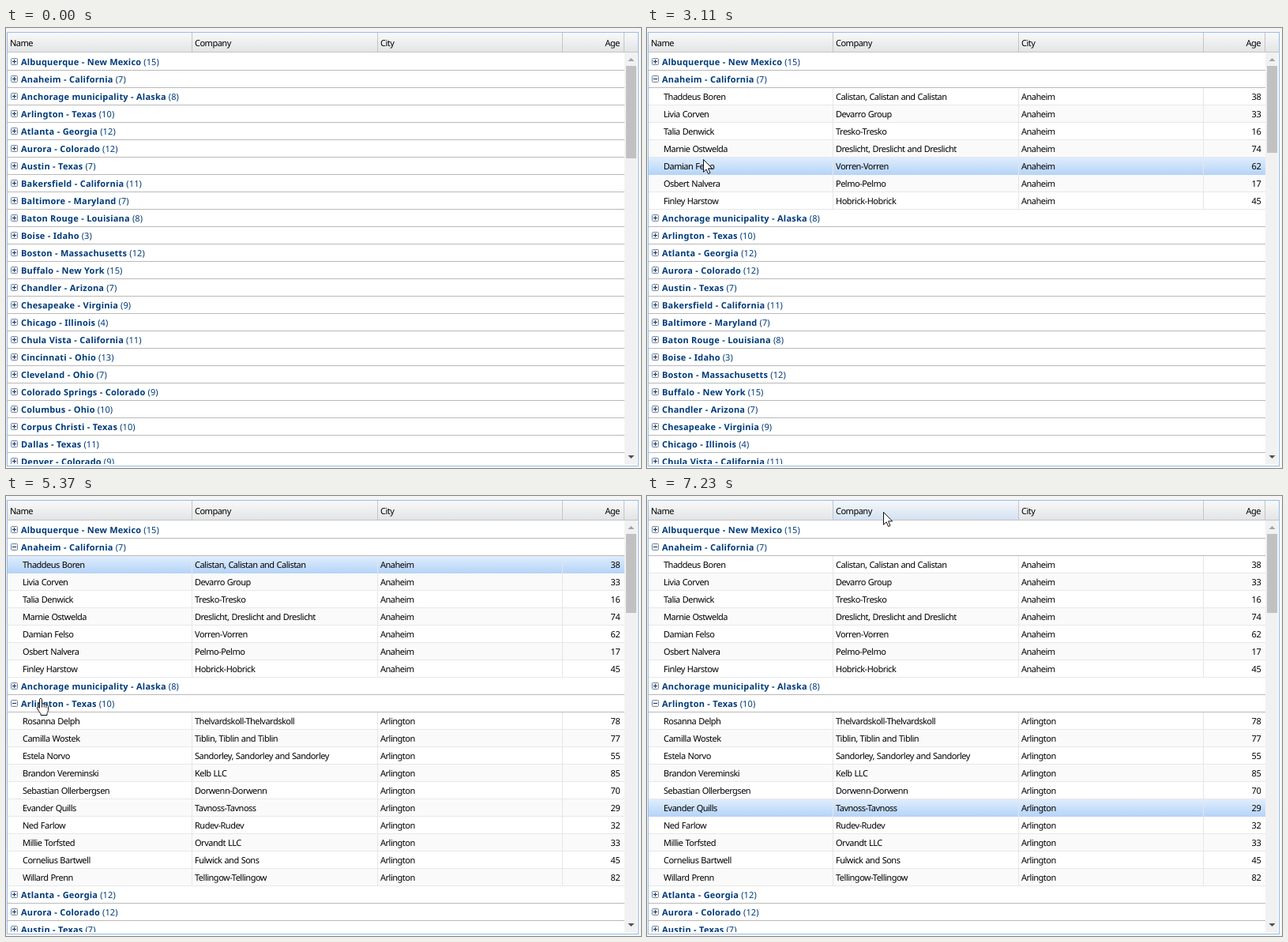
Recreate the animation shown at these times as an HTML page. Size 804x557 px, loop 8000 ms.

```html
<!DOCTYPE html>
<html lang="en">
<head>
<meta charset="utf-8">
<title>Grouped grid</title>
<style>
  html, body { margin: 0; width: 100%; height: 100%; overflow: hidden; background: #f5f5f5; }
  svg { display: block; width: 100vw; height: 100vh; cursor: default; }
  text { font: 11px "Noto Sans", "Open Sans", sans-serif; letter-spacing: -.5px; word-spacing: .6px;
         fill: #000; white-space: pre; text-rendering: geometricPrecision; }
  .group { font-weight: 700; letter-spacing: .2px; word-spacing: .2px; fill: #003b7a; }
  .count { font-weight: 400; letter-spacing: .1px; }
  .num { letter-spacing: -.25px; text-anchor: end; }
</style>
</head>
<body>
<svg id="stage" viewBox="0 0 804 557" preserveAspectRatio="none">
  <defs>
    <linearGradient id="head" x2="0" y2="1"><stop stop-color="#f9f9f9"/><stop offset="1" stop-color="#e3e4e6"/></linearGradient>
    <linearGradient id="headOver" x2="0" y2="1"><stop stop-color="#f6f8fb"/><stop offset="1" stop-color="#d3e1f1"/></linearGradient>
    <linearGradient id="rowOver" x2="0" y2="1"><stop stop-color="#dfedfe"/><stop offset="1" stop-color="#b5d3f7"/></linearGradient>
    <clipPath id="body"><rect x="2" y="31" width="781" height="521"/></clipPath>
  </defs>
</svg>
<script>
const LOOP = 8000, TOP = 32, ROW = 22, BOTTOM = 552;
const COLS = [235, 470, 704];
const svg = document.getElementById('stage');

const groups = `Albuquerque - New Mexico|15
Anaheim - California|7
Anchorage municipality - Alaska|8
Arlington - Texas|10
Atlanta - Georgia|12
Aurora - Colorado|12
Austin - Texas|7
Bakersfield - California|11
Baltimore - Maryland|7
Baton Rouge - Louisiana|8
Boise - Idaho|3
Boston - Massachusetts|12
Buffalo - New York|15
Chandler - Arizona|7
Chesapeake - Virginia|9
Chicago - Illinois|4
Chula Vista - California|11
Cincinnati - Ohio|13
Cleveland - Ohio|7
Colorado Springs - Colorado|9
Columbus - Ohio|10
Corpus Christi - Texas|10
Dallas - Texas|11
Denver - Colorado|9`.split('\n').map(line => line.split('|'));

const people = {
  Anaheim: `Thaddeus Boren|Calistan, Calistan and Calistan|38
Livia Corven|Devarro Group|33
Talia Denwick|Tresko-Tresko|16
Marnie Ostwelda|Dreslicht, Dreslicht and Dreslicht|74
Damian Felso|Vorren-Vorren|62
Osbert Nalvera|Pelmo-Pelmo|17
Finley Harstow|Hobrick-Hobrick|45`,
  Arlington: `Rosanna Delph|Thelvardskoll-Thelvardskoll|78
Camilla Wostek|Tiblin, Tiblin and Tiblin|77
Estela Norvo|Sandorley, Sandorley and Sandorley|55
Brandon Vereminski|Kelb LLC|85
Sebastian Ollerbergsen|Dorwenn-Dorwenn|70
Evander Quills|Tavnoss-Tavnoss|29
Ned Farlow|Rudev-Rudev|32
Millie Torfsted|Orvandt LLC|33
Cornelius Bartwell|Fulwick and Sons|45
Willard Prenn|Tellingow-Tellingow|82`
};

// Each state of the list starts at a time and has its own scroll thumb end
const views = [
  { from: 0, open: [], thumbEnd: 165 },
  { from: 1720, open: ['Anaheim'], thumbEnd: 158 },
  { from: 5370, open: ['Anaheim', 'Arlington'], thumbEnd: 148 }
];

// Pointer moves: "live" is how many steps still update the row highlight
const moves = [
  { from: 490, to: 1240, steps: 11, live: 0,
    path: [[671, 536], [470, 400], [270, 240], [130, 130], [60, 80], [43, 66]] },
  { from: 1720, to: 2260, steps: 8, live: 8, path: [[43, 66], [45, 87], [50, 112], [57, 130]] },
  { from: 2410, to: 2930, steps: 8, live: 8,
    path: [[57, 131], [58, 133], [60, 142], [62, 152], [65, 160], [67, 164], [69, 166], [70, 166]] },
  { from: 3110, to: 3560, steps: 7, live: 7, path: [[71, 166], [73, 154], [77, 130], [81, 112]] },
  { from: 3710, to: 3710, steps: 1, live: 0, path: [[83, 92]] },
  { from: 3960, to: 4410, steps: 7, live: 1, path: [[82, 94], [66, 165], [50, 232], [43, 252]] },
  { from: 4570, to: 4570, steps: 1, live: 0, arrow: true, path: [[38, 251]] },
  { from: 4720, to: 4970, steps: 4, live: 0, path: [[43, 253], [44, 256]] },
  { from: 5370, to: 5680, steps: 5, live: 0, path: [[44, 256], [62, 276], [88, 299], [104, 311]] },
  { from: 5830, to: 6600, steps: 11, live: 11,
    path: [[107, 314], [122, 345], [138, 380], [148, 388], [156, 379]] },
  { from: 6770, to: 7230, steps: 7, live: 1, path: [[164, 386], [210, 260], [272, 90], [299, 20]] }
];

function add(parent, tag, attrs = {}, text) {
  const el = document.createElementNS('http://www.w3.org/2000/svg', tag);
  for (const key in attrs) el.setAttribute(key, attrs[key]);
  if (text !== undefined) el.textContent = text;
  parent.appendChild(el);
  return el;
}
const box = (parent, x, y, width, height, fill) => add(parent, 'rect', { x, y, width, height, fill });
const label = (parent, x, y, text, cls = '') => add(parent, 'text', { x, y, class: cls }, text);
const show = (el, on) => el.setAttribute('display', on ? 'inline' : 'none');

function listItems(open) {
  const items = [];
  for (const [name, count] of groups) {
    const city = name.split(' - ')[0];
    const expanded = open.includes(city);
    items.push({ name, count, expanded });
    if (expanded) {
      people[city].split('\n').forEach((line, i) => {
        const [person, company, age] = line.split('|');
        items.push({ person, company, city, age, odd: i % 2 });
      });
    }
  }
  return items.slice(0, Math.ceil((BOTTOM - TOP) / ROW));
}

function drawGroup(back, front, item, y) {
  box(back, 2, y + 21, 781, 1, '#b9b9b9');
  add(front, 'rect', { x: 6.5, y: y + 6.5, width: 8, height: 8, rx: 1, fill: '#eef2f7', stroke: '#74859e' });
  box(front, 8, y + 10, 5, 1, '#17365f');
  if (!item.expanded) box(front, 10, y + 8, 1, 5, '#17365f');
  const text = label(front, 19, y + 15, item.name, 'group');
  add(text, 'tspan', { class: 'count', dx: 3 }, `(${item.count})`);
}

function drawRow(back, front, item, y) {
  box(back, 2, y, 781, 21, item.odd ? '#fafafa' : '#fff');
  box(back, 2, y + 21, 781, 1, '#e8e8e8');
  for (const x of COLS) box(front, x, y, 1, 22, '#e6e6e6');
  label(front, 21, y + 15, item.person);
  label(front, 239, y + 15, item.company);
  label(front, 474, y + 15, item.city);
  label(front, 777.5, y + 15, item.age, 'num');
}

// Panel frame and list
box(svg, 0, 0, 804, 557, '#f5f5f5');
box(svg, 1, 5, 800, 550, '#99bce8');
box(svg, 2, 6, 798, 548, '#fff');
const list = add(svg, 'g', { 'clip-path': 'url(#body)' });
const backs = add(list, 'g');
const rowOver = box(list, 2, 0, 781, 22, 'url(#rowOver)');
const fronts = add(list, 'g');
for (const view of views) {
  view.items = listItems(view.open);
  view.back = add(backs, 'g');
  view.front = add(fronts, 'g');
  view.items.forEach((item, i) =>
    (item.person ? drawRow : drawGroup)(view.back, view.front, item, TOP + i * ROW));
}

// Header
box(svg, 2, 6, 798, 24, 'url(#head)');
const headOver = box(svg, 236, 6, 234, 24, 'url(#headOver)');
box(svg, 2, 30, 798, 1, '#c5c5c5');
for (const x of [...COLS, 782]) box(svg, x, 6, 1, 24, '#c5c5c5');
label(svg, 5, 23, 'Name');
label(svg, 239, 23, 'Company');
label(svg, 474, 23, 'City');
add(svg, 'text', { x: 777, y: 23, 'text-anchor': 'end' }, 'Age');

// Scroll bar
box(svg, 783, 31, 16, 521, '#f1f1f1');
add(svg, 'path', { d: 'M787.5 42h8l-4-4z', fill: '#a3a3a3' });
add(svg, 'path', { d: 'M787.5 541h8l-4 4z', fill: '#505050' });
const thumb = box(svg, 785, 48, 13, 117, '#c1c1c1');

// Pointers, with their hot spots at 0,0
const ink = { fill: '#fff', stroke: '#111', 'stroke-width': 1, 'stroke-linejoin': 'round' };
const arrow = add(svg, 'path', { d: 'M.5 .5V16.3L4.1 12.9L6.6 18.6L9 17.5L6.6 11.9H11.6Z', ...ink });
const hand = add(svg, 'g');
add(hand, 'path', {
  d: 'M-1.5 1.4C-1.5 -.2 1.5 -.2 1.5 1.4V7.5C2 6.4 4.2 6.7 4.3 8.2C4.9 7.3 6.8 7.7 6.9 9.1' +
     'C7.6 8.3 9.5 8.8 9.5 10.4V14.6C9.5 17 8 17.8 8 19.5V21.5H0V19.8C-1.4 17.4 -3.4 15.6 -4.5 13' +
     'C-5.2 11.2 -3 10.3 -1.5 12.3Z', ...ink
});
add(hand, 'path', { d: 'M1.5 7.5V11.5M4.3 8.5V11.5M6.9 9.5V12', fill: 'none', stroke: '#111' });

function stepAt(move, t) {
  if (move.steps < 2) return 0;
  const span = (move.to - move.from) / (move.steps - 1);
  return Math.min(move.steps - 1, Math.floor((t - move.from + 12) / span));
}

function pointAt({ path, steps }, step) {
  if (path.length < 2) return path[0];
  const u = step / (steps - 1) * (path.length - 1);
  const i = Math.min(path.length - 2, Math.floor(u));
  return path[i].map((v, axis) => Math.round(v + (path[i + 1][axis] - v) * (u - i)));
}

const indexAt = y => Math.floor((y - TOP) / ROW);

function render(t) {
  const view = views.filter(v => t >= v.from).pop();
  for (const v of views) {
    show(v.back, v === view);
    show(v.front, v === view);
  }
  thumb.setAttribute('height', view.thumbEnd - 48);

  let hover = -1, move = null;
  for (const m of moves) {
    if (t < m.from) break;
    move = m;
    if (m.live) hover = indexAt(pointAt(m, Math.min(stepAt(m, t), m.live - 1))[1]);
  }
  const overRow = hover >= 0 && !!view.items[hover].person;
  show(rowOver, overRow);
  if (overRow) rowOver.setAttribute('y', TOP + hover * ROW);

  const [x, y] = move ? pointAt(move, stepAt(move, t)) : [-99, -99];
  const item = view.items[indexAt(y)];
  const pointing = !!move && !move.arrow && !!item && !item.person;
  show(hand, pointing);
  show(arrow, !!move && !pointing);
  (pointing ? hand : arrow).setAttribute('transform', `translate(${x} ${y})`);
  show(headOver, y >= 6 && y < 30 && x > COLS[0] && x < COLS[1]);
}

function tick() {
  render(performance.now() % LOOP);
  requestAnimationFrame(tick);
}
tick();
</script>
</body>
</html>
```
